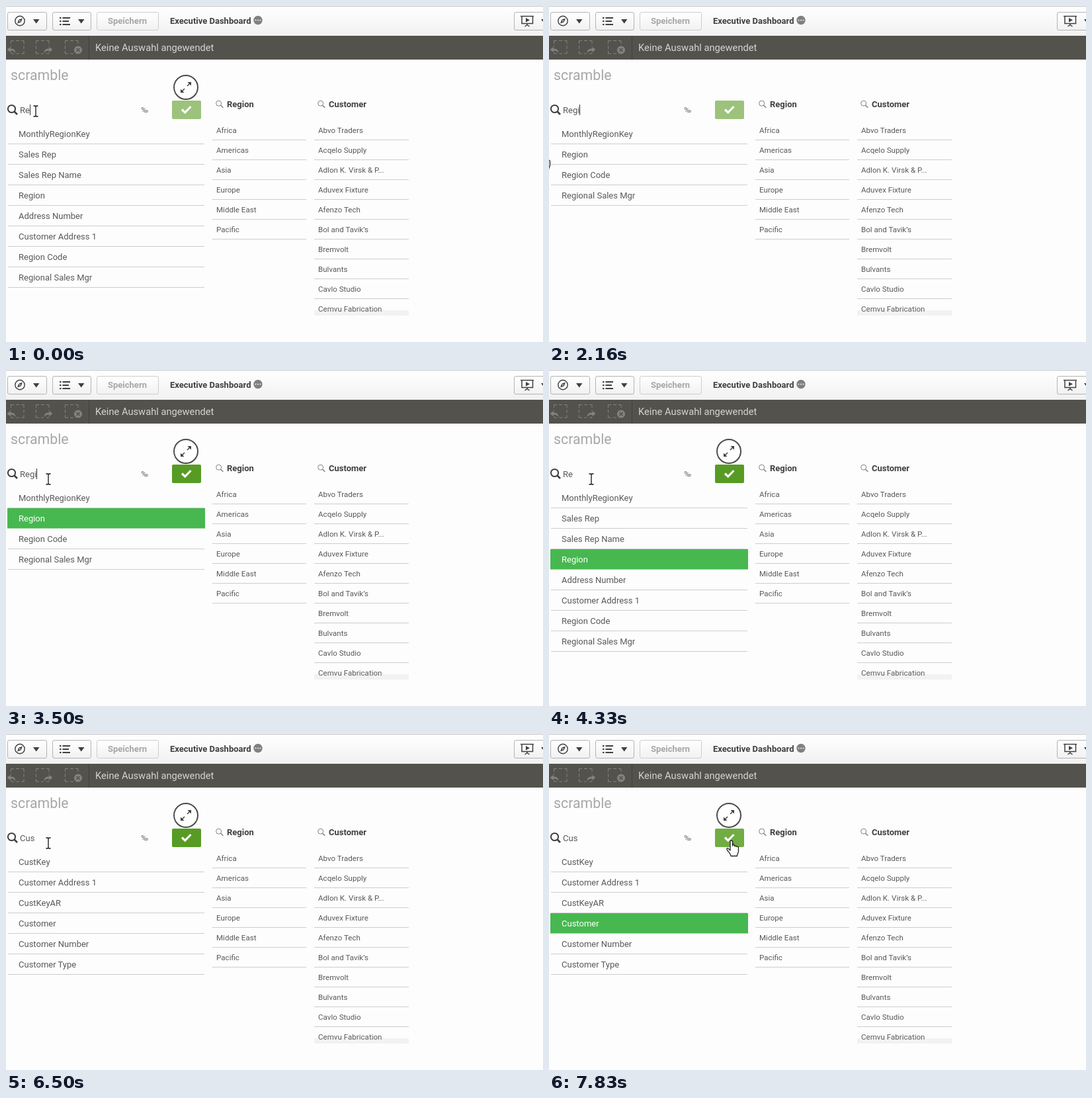
An HTML page that plays this animation: 812 by 508 pixels, repeating every 8 s.

```html
<!DOCTYPE html>
<html lang="de">
<head>
<meta charset="utf-8">
<title>Dashboard field search</title>
<style>
  html, body { margin: 0; width: 100%; height: 100%; overflow: hidden; background: #fdfdfd; }
  svg { display: block; width: 812px; height: 508px; font: 13px Roboto, "Open Sans", sans-serif; fill: #595959; }
  text { white-space: pre; }
  .bold { font-weight: 700; fill: #404040; }
  .small { font-size: 11.6px; }
  .rule { stroke: #cdcdcd; }
  .stroke { fill: none; stroke: #404040; }
</style>
</head>
<body>
<svg viewBox="0 0 812 508">
  <defs>
    <linearGradient id="bar" x2="0" y2="1"><stop stop-color="#fff"/><stop offset="1" stop-color="#f1f1f1"/></linearGradient>
    <g id="lens"><circle cx="321.7" cy="147.2" r="4" class="stroke" style="stroke:#808080"/><path d="M324.6 150.2l3.8 3.6" stroke="#808080" stroke-width="1.5"/></g>
    <path id="frame" d="M.5 5V.5H5M8 .5h5M16 .5h4V5M20 8v5M20 16v4h-4M13 20H8M5 20H.5v-4M.5 13V8" fill="none" stroke="#83827e"/>
    <path id="drop" d="M0 0h9.5L4.75 6.5z" fill="#404040"/>
  </defs>
  <rect width="812" height="508" fill="#fdfdfd"/>

  <rect width="812" height="45" fill="url(#bar)"/>
  <path d="M0 .5h812" stroke="#c8c8c8"/>
  <g fill="url(#bar)" stroke="#b4b4b4">
    <rect x="2.5" y="9.5" width="59" height="27" rx="2.5"/>
    <rect x="70.5" y="9.5" width="58" height="27" rx="2.5"/>
    <rect x="137.5" y="9.5" width="93" height="27" rx="2.5" stroke="#cecece"/>
    <rect x="768.5" y="9.5" width="60" height="27" rx="2.5"/>
  </g>
  <circle cx="21" cy="22.5" r="7.2" class="stroke" stroke-width="1.4"/>
  <path d="M25 18.5l-2.3 5.7-5.7 2.3 2.3-5.7z" fill="#404040"/>
  <circle cx="21" cy="22.5" r="1" fill="#fff"/>
  <use href="#drop" x="41" y="20"/>
  <path d="M81 18h2.5M81 23h2.5M81 28h2.5M85.500 18H97M85.500 23H95M85.500 28H97" class="stroke" stroke-width="2"/>
  <use href="#drop" x="109" y="20"/>
  <text x="154" y="27" class="bold" style="fill:#a6a6a6">Speichern</text>
  <text x="248" y="27" class="bold">Executive Dashboard</text>
  <circle cx="381" cy="21.500" r="6.700" fill="#808080"/>
  <path d="M376.500 21.500h2m1.500 0h2m1.500 0h2" stroke="#eee" stroke-width="1.600"/>
  <path d="M778 15.500h20M780 15.500v11h16.500v-11M788 26.500v3M784.500 31l3.500-2.500 3.500 2.500" class="stroke" stroke-width="1.500"/>
  <path d="M786 18l6 3.300-6 3.300z" fill="#404040"/>
  <use href="#drop" x="809" y="20"/>

  <rect y="45" width="812" height="36" fill="#53524d"/>
  <path d="M125.500 45v36" stroke="#42413d"/>
  <use href="#frame" x="7" y="52"/>
  <use href="#frame" x="45" y="52"/>
  <use href="#frame" x="89" y="52"/>
  <g fill="#83827e" stroke="#53524d">
    <path id="undo" d="M1 66l6-5v3c5 0 8 2 8 9-2-4-4-5-8-5v3z"/>
    <use href="#undo" transform="matrix(-1 0 0 1 72 0)"/>
    <circle cx="109" cy="66.500" r="6.500"/>
    <path d="M106.500 64l5 5m0-5l-5 5" stroke-width="1.500"/>
  </g>
  <text x="135" y="68" font-size="14.700" fill="#d4d4d1">Keine Auswahl angewendet</text>

  <text x="7" y="112" font-size="21.300" fill="#a8a8a8">scramble</text>
  <g id="expand">
    <circle cx="272" cy="123" r="18" fill="#fff" stroke="#4a4a4a" stroke-width="2"/>
    <path d="M274 121l4-4M270 125l-4 4" class="stroke" stroke-width="1.500"/>
    <path d="M274.500 115H280v5.500zM264 125.500v5.500h5.500z" fill="#404040"/>
  </g>
  <circle cx="8.500" cy="155.500" r="5.600" class="stroke" stroke-width="2"/>
  <path d="M12.500 159.500l4.500 4.500" class="stroke" stroke-width="2.600"/>
  <text id="query" x="21" y="162"></text>
  <text id="hint" x="24" y="162" font-style="italic" fill="#a0a0a0">Search Dimensions</text>
  <text id="permille" x="204.500" y="161" font-size="11">‰</text>
  <path id="caret" d="M0 149v16" stroke="#333"/>
  <rect id="button" x="251" y="143" width="44" height="28" rx="2"/>
  <path d="M266 156.500l4.700 4.500 8.800-9" fill="none" stroke="#fff" stroke-width="3.200"/>

  <g id="fields"></g>
  <g id="panels"></g>

  <path id="beam" d="M-3.500-8h2.500l1 1 1-1h2.500M0-7V7M-3.500 8h2.500l1-1 1 1h2.500" fill="none" stroke="#111" stroke-width="1.300"/>
  <path id="hand" d="M-2 1.500C-2-.5 1.500-.5 1.500 1.500V8C2-.0 2 7 3.500 7S5 8.500 5 9c.5-1.500 3-1 3 .5 1-1 2.500 0 2.500 1.500V16c0 3-2 4-2 7.500H-1C-1 20-6 16-7 13.500c-.5-2 1.500-2.500 3-.5l2 2z" fill="#fff" stroke="#222" stroke-width="1.300" stroke-linejoin="round"/>
</svg>
<script>
const LOOP = 8000;
const $ = id => document.getElementById(id);

function add(parent, tag, attrs, text = "") {
  const node = document.createElementNS("http://www.w3.org/2000/svg", tag);
  for (const key in attrs) node.setAttribute(key, attrs[key]);
  node.textContent = text;
  return parent.appendChild(node);
}

function addPanel(x, title, items, openEnd) {
  const panel = $("panels");
  add(panel, "use", { href: "#lens", x: x - 312 });
  add(panel, "text", { x: x + 22, y: 153, class: "bold" }, title);
  if (openEnd) add(panel, "rect", { x, y: 460, width: 143, height: 8, fill: "#f2f2f2" });
  items.forEach((item, i) => {
    add(panel, "text", { x: x + 6, y: 192 + 30 * i, class: "small" }, item);
    if (openEnd && i === items.length - 1) return;
    add(panel, "path", { d: `M${x} ${202.5 + 30 * i}h${openEnd ? 143 : 142}`, class: "rule" });
  });
}

addPanel(312, "Region", ["Africa", "Americas", "Asia", "Europe", "Middle East", "Pacific"], false);
addPanel(466, "Customer", [
  "Abvo Traders", "Acqelo Supply", "Adlon K. Virsk & P...", "Aduvex Fixture", "Afenzo Tech",
  "Bol and Tavik’s", "Bremvolt", "Bulvants", "Cavlo Studio", "Cemvu Fabrication"
], true);

const lists = {
  all: ["AccountGroup", "AccountGroupDesc", "Account", "MonthlyRegionKey", "Budget Amount", "Line Desc 1", "ClassTurns", "ThroughputQty"],
  re: ["MonthlyRegionKey", "Sales Rep", "Sales Rep Name", "Region", "Address Number", "Customer Address 1", "Region Code", "Regional Sales Mgr"],
  reg: ["MonthlyRegionKey", "Region", "Region Code", "Regional Sales Mgr"],
  c: ["AccountGroup", "AccountGroupDesc", "Account", "Line Desc 1", "ClassTurns", "CustKey", "Customer Address 1", "Region Code"],
  cus: ["CustKey", "Customer Address 1", "CustKeyAR", "Customer", "Customer Number", "Customer Type"]
};
const colors = { pale: "#9cc27c", ready: "#579b24", hover: "#70ad42" };

const rows = Array.from({ length: 8 }, (_, i) => {
  const y = 31 * i, group = add($("fields"), "g", {});
  return {
    group,
    fill: add(group, "rect", { x: 2, y: 209 + y - 31, width: 299, height: 30.5, fill: "#47b850" }),
    line: add(group, "path", { d: `M3 ${208.5 + y}h297`, class: "rule" }),
    label: add(group, "text", { x: 19, y: 198 + y })
  };
});

const beam = (x, y) => ({ pointer: "beam", x, y });
const hand = (x, y) => ({ pointer: "hand", x, y });

// Each step changes only the listed properties and keeps the rest.
const steps = [
  [0, { query: "Re", list: "re", picked: "", button: "pale", caret: true, expand: true, ...beam(45, 159) }],
  [500, { query: "Reg", list: "reg", expand: false, pointer: "" }],
  [1000, { query: "Regi" }],
  [1500, { caret: false }],
  [2160, { caret: true, ...hand(-9, 224) }],
  [2330, { expand: true, ...hand(20, 232) }],
  [2500, hand(40, 258)],
  [2660, { caret: false, ...hand(52, 280) }],
  [2830, hand(60, 262)],
  [3000, hand(59, 240)],
  [3160, { caret: true, ...hand(58, 226) }],
  [3330, { caret: false, picked: "Region", button: "ready" }],
  [3500, { caret: true, ...beam(64, 165) }],
  [4000, { caret: false }],
  [4160, { query: "Reg" }],
  [4330, { query: "Re", list: "re" }],
  [4500, { query: "R" }],
  [4660, { query: "", list: "all", picked: "", caret: true }],
  [5160, { caret: false }],
  [5500, { query: "C", list: "c", caret: true }],
  [5830, { query: "Cu", list: "cus" }],
  [6000, { query: "Cus" }],
  [6500, { caret: false }],
  [6660, hand(62, 205)],
  [6830, hand(58, 255)],
  [7000, { caret: true, ...hand(56, 286) }],
  [7330, { caret: false, picked: "Customer", button: "ready" }],
  [7500, hand(130, 248)],
  [7660, hand(225, 192)],
  [7830, { button: "hover", ...hand(276, 161) }]
];

const show = (node, visible) => node.setAttribute("visibility", visible ? "visible" : "hidden");

function render(time) {
  const state = Object.assign({}, ...steps.filter(([at]) => at <= time).map(([, change]) => change));
  $("query").textContent = state.query;
  show($("hint"), !state.query);
  show($("permille"), state.query);
  show($("caret"), state.caret);
  const caretX = 21.5 + Math.round(state.query ? $("query").getComputedTextLength() : 0);
  $("caret").setAttribute("transform", `translate(${caretX})`);
  $("button").setAttribute("fill", colors[state.button]);
  show($("expand"), state.expand);

  rows.forEach((row, i) => {
    const name = lists[state.list][i], picked = !!name && name === state.picked;
    row.group.style.display = name ? "" : "none";
    row.label.textContent = name || "";
    row.label.setAttribute("fill", picked ? "#fff" : "#595959");
    row.fill.style.display = picked ? "" : "none";
    row.line.style.display = picked ? "none" : "";
  });
  for (const id of ["beam", "hand"]) {
    show($(id), state.pointer === id);
    $(id).setAttribute("transform", `translate(${state.x} ${state.y})`);
  }
}

const start = performance.now();
function tick() {
  render((performance.now() - start) % LOOP);
  requestAnimationFrame(tick);
}
tick();
</script>
</body>
</html>
```
